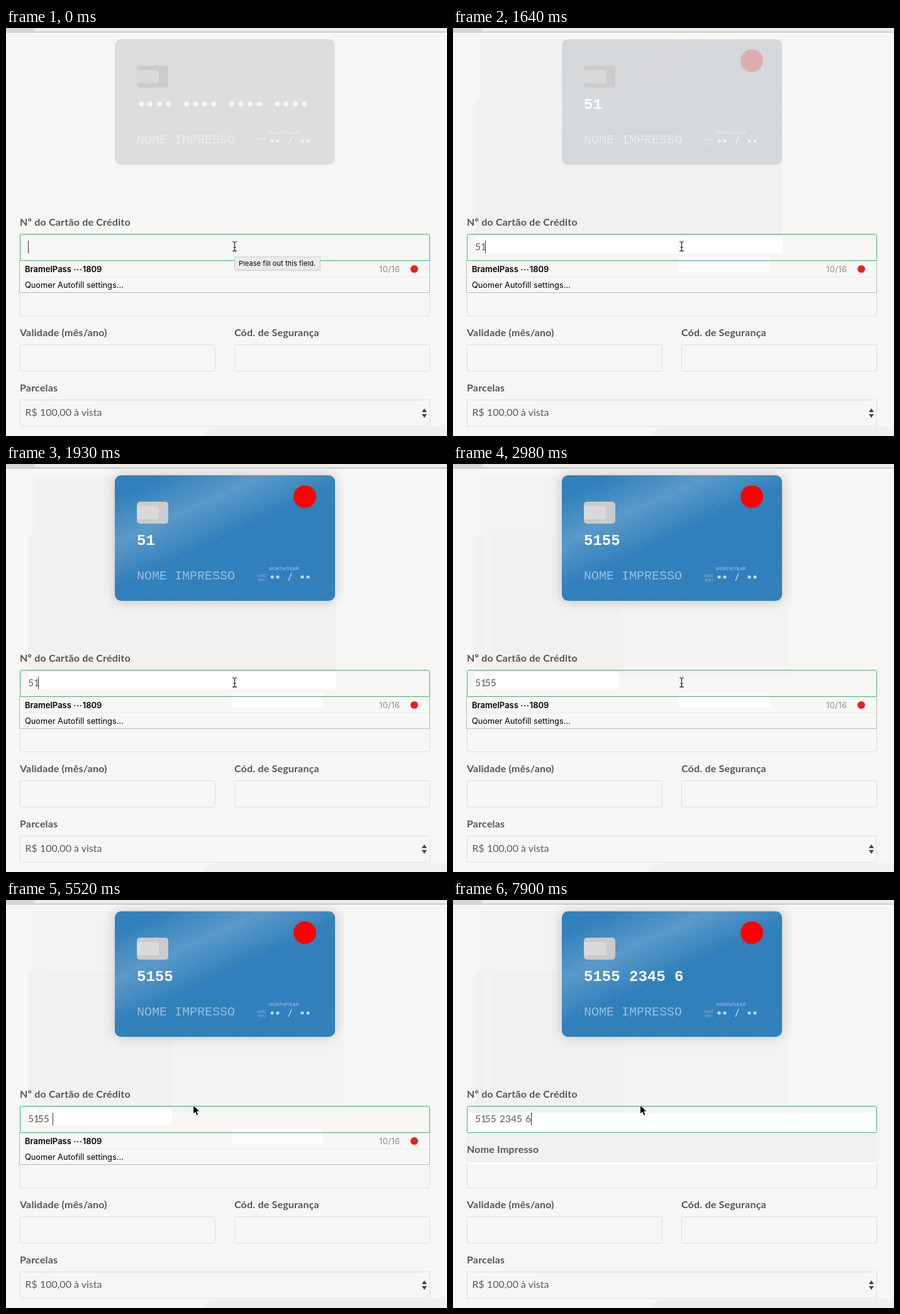
Animation, 701 px wide and 650 px high, one loop 8000 ms. Source, as an HTML page:

```html
<!DOCTYPE html>
<html lang="pt-BR">
<head>
<meta charset="utf-8">
<title>Cartão de crédito</title>
<style>
  html, body { margin: 0; width: 100%; height: 100%; overflow: hidden; background: #f7f6f4; }
  svg { position: absolute; left: 0; top: 0; }
  #card, #blue { position: absolute; width: 350px; height: 200px; border-radius: 10px; }
  #card { left: 173px; top: 18px; background: #ddd; }
  #blue {
    --weave: #fff0 1px, #ffffff08 2px, #ffffff0a 3px, #ffffff0d 4px;
    background:
      repeating-linear-gradient(45deg, var(--weave)),
      repeating-linear-gradient(135deg, var(--weave)),
      repeating-linear-gradient(90deg, var(--weave)),
      repeating-linear-gradient(210deg, var(--weave)),
      linear-gradient(-25deg, #fff0 50%, #fff3 70%, #fff0 90%),
      #156fb2;
    box-shadow: 0 0 20px #0003;
  }
  .label { font: bold 16px Lato, sans-serif; letter-spacing: .2px; fill: #575654; }
  .value { font: 16px Lato, sans-serif; fill: #5c5b59; }
  #typed { font-size: 15.6px; word-spacing: 1px; white-space: pre; }
  #typed .one { letter-spacing: -2.3px; }
  .menu { font: 12.8px Inter, sans-serif; }
  .tip { font: 11px Inter, sans-serif; letter-spacing: .08px; }
  .mono { font-family: "Liberation Mono", monospace; fill: #fff; white-space: pre; }
  .tiny { font: bold 7.1px "Liberation Sans", sans-serif; fill: #fff; }
  .field { fill: none; stroke: #dddcda; }
</style>
</head>
<body>
<svg width="701" height="650">
  <g id="shade1" fill="#f2f1ef">
    <path d="M43 18H524V338H35V114H43Z"/>
    <path fill="#fff" d="M35 331H524V359H35Z"/>
  </g>
  <g id="shade2" fill="#f2f1ef">
    <path fill="#f4f3f1" d="M43 18H537V338H35V114H43Z"/>
    <path d="M35 114H50V338H35ZM59 114H264V338H59Z"/>
    <path fill="#fff" d="M35 331H50V359H35ZM59 331H264V359H59Z"/>
  </g>
  <g id="shade3" fill="#f2f1ef">
    <path fill="#f4f3f1" d="M43 18H537V338H35V114H43Z"/>
    <path d="M35 114H50V338H35ZM59 114H264V338H59ZM22 371H674V416H22Z"/>
    <path fill="#fff" d="M23 339H673V370H23ZM22 417H674V422H22Z"/>
  </g>
</svg>

<div id="card"><div id="blue"></div></div>

<svg width="701" height="650">
  <path fill="#ececeb" d="M0 0H701V6H0Z"/>
  <path fill="#d2d6d8" d="M0 0H46V5H0Z"/>
  <path fill="#a8a8a8" d="M0 6H701V7H0Z"/>
  <path fill="#f0efed" d="M311 650Q318 639 334 636H701V650Z"/>

  <rect x="208" y="60" width="50" height="35" rx="5" fill="#cbcbcb"/>
  <path fill="#dadada" d="M208 67H238Q243 67 243 72V83Q243 88 238 88H208Z"/>
  <circle id="brand" cx="475" cy="52" r="18" fill="#f00"/>
  <g id="dots" fill="#f7f7f6"></g>
  <text id="number" class="mono" x="208" y="129" font-size="24" font-weight="bold"></text>
  <text class="mono" x="208" y="184" font-size="20" opacity=".5">NOME IMPRESSO</text>
  <g class="tiny" opacity=".42">
    <text x="418" y="169">MONTH/YEAR</text>
    <g text-anchor="end" font-weight="normal">
      <text x="413" y="180">valid</text>
      <text x="413" y="187">thru</text>
    </g>
  </g>
  <g fill="#fff" opacity=".7">
    <circle cx="423" cy="180" r="2.6"/><circle cx="432" cy="180" r="2.6"/>
    <circle cx="471" cy="180" r="2.6"/><circle cx="480" cy="180" r="2.6"/>
    <path d="M449 186L454 174" stroke="#fff" stroke-width="1.3"/>
  </g>

  <g class="label">
    <text x="22" y="315">Nº do Cartão de Crédito</text>
    <text x="22" y="403">Nome Impresso</text>
    <text x="22" y="491">Validade (mês/ano)</text>
    <text x="363" y="491">Cód. de Segurança</text>
    <text x="22" y="579">Parcelas</text>
  </g>
  <g class="field">
    <rect x="22.5" y="416.5" width="651" height="42" rx="2"/>
    <rect x="22.5" y="504.5" width="310" height="42" rx="2"/>
    <rect x="363.5" y="504.5" width="310" height="42" rx="2"/>
    <rect x="22.5" y="592.5" width="651" height="42" rx="2"/>
  </g>
  <text class="value" x="30.5" y="618">R$ 100,00 à vista</text>
  <path fill="#444" d="M661 612L665 606L669 612ZM661 615L665 621L669 615Z"/>

  <g id="menu" class="menu">
    <rect x="21.5" y="370.5" width="652" height="51" fill="#f7f7f6" stroke="#b3b6b4"/>
    <path d="M22 396.5H673" stroke="#e8e8e7"/>
    <path id="glow" fill="#fff" d="M359 365H504V388H359Z"/>
    <text x="30" y="389" font-size="13" font-weight="600">BramelPass <tspan letter-spacing=".7">···</tspan>1809</text>
    <text x="30" y="414">Quomer Autofill settings...</text>
    <text x="593" y="389" font-size="13" letter-spacing=".4" fill="#8b8b8b">10/16</text>
    <circle cx="649" cy="384" r="6" fill="#e8201c"/>
  </g>
  <rect x="22.5" y="328.5" width="651" height="42" rx="2" fill="none" stroke="#3db17b"/>
  <text id="typed" class="value" x="35" y="354"></text>
  <path id="caret" d="M.5 339V359" stroke="#333"/>

  <g id="tip">
    <rect x="363.5" y="365.5" width="136" height="22" fill="#0001"/>
    <rect x="363.5" y="364.5" width="136" height="21" fill="#ebebeb" stroke="#d0d0d0"/>
    <text class="tip" x="370" y="379">Please fill out this field.</text>
  </g>
  <g id="beam" fill="none" stroke-linecap="square">
    <path id="beamShape" d="M-3 -7.5Q0 -7.5 0 -5.5Q0 -7.5 3 -7.5M0 -6V6M-3 7.5Q0 7.5 0 5.5Q0 7.5 3 7.5M-1.5 1.5H1.5" stroke="#fff" stroke-width="2.6"/>
    <use href="#beamShape"/>
    <path d="M-3 -7.5Q0 -7.5 0 -5.5Q0 -7.5 3 -7.5M0 -6V6M-3 7.5Q0 7.5 0 5.5Q0 7.5 3 7.5M-1.5 1.5H1.5" stroke="#111" stroke-width="1.1"/>
  </g>
  <path id="arrow" d="M-.5 -.5V14L2.8 11L5.3 16.5L8 15.3L5.6 10H10Z" fill="#000" stroke="#fff"/>
</svg>

<script>
const $ = id => document.getElementById(id);
const LOOP = 8000;

// Each track is a list of [start time, value]; a value holds until the next one.
const typing = [[0, ''], [1350, '5'], [1500, '51'], [2230, '515'], [2530, '5155 '], [6570, '5155 2'],
  [6870, '5155 23'], [7010, '5155 234'], [7300, '5155 2345 '], [7900, '5155 2345 6']];
const printing = [[0, ''], [1350, '5'], [1500, '51'], [2230, '515'], [2530, '5155'], [6720, '5155 2'],
  [6870, '5155 23'], [7160, '5155 234'], [7300, '5155 2345'], [7900, '5155 2345 6']];
const blink = [[0, 1], [450, 0], [900, 1], [2980, 0], [3580, 1], [4030, 0], [4480, 1],
  [4930, 0], [5520, 1], [5970, 0], [6570, 1], [7750, 0], [7900, 1]];
const tint = [[0, 0], [1640, .04], [1780, .74], [1930, 1]];
const brand = [[0, 0], [1640, .2], [1780, .88], [1930, 1]];
const travel = [4780, 4930, 5080, 5220, 5370, 5520];

const at = (track, t) => track.findLast(([start]) => start <= t)[1];
const show = (id, on) => $(id).style.display = on ? '' : 'none';

for (let i = 0; i < 19; i++) {
  if (i % 5 < 4) $('dots').innerHTML += `<circle cx="${215 + 14.4 * i}" cy="121" r="4"/>`;
}

let lastTyped = null;
function setTyped(text) {
  if (text === lastTyped) return;
  lastTyped = text;
  $('typed').innerHTML = text.replace('1', '<tspan class="one">1</tspan>');
}

function draw(now) {
  const t = now % LOOP;
  const printed = at(printing, t);

  setTyped(at(typing, t));
  $('number').textContent = printed;
  show('dots', !printed);
  show('caret', at(blink, t));
  const caretX = 35 + (lastTyped ? Math.round($('typed').getComputedTextLength()) : 0);
  $('caret').setAttribute('transform', `translate(${caretX})`);

  $('blue').style.opacity = at(tint, t);
  $('brand').style.opacity = at(brand, t);

  show('tip', t < 1350);
  show('glow', t >= 1350);
  show('menu', t < 6570);
  show('shade1', t >= 1350 && t < 2530);
  show('shade2', t >= 2530 && t < 6570);
  show('shade3', t >= 6570);

  const p = travel.filter(start => start <= t).length / travel.length;
  const ease = p * p * (3 - 2 * p);
  const x = 363.5 - 65.5 * ease;
  const y = 348 - 21 * ease + 22 * Math.sin(Math.PI * ease);
  for (const id of ['beam', 'arrow']) $(id).setAttribute('transform', `translate(${x} ${y})`);
  show('beam', y >= 329);
  show('arrow', y < 329);

  requestAnimationFrame(draw);
}
draw(0);
</script>
</body>
</html>
```
